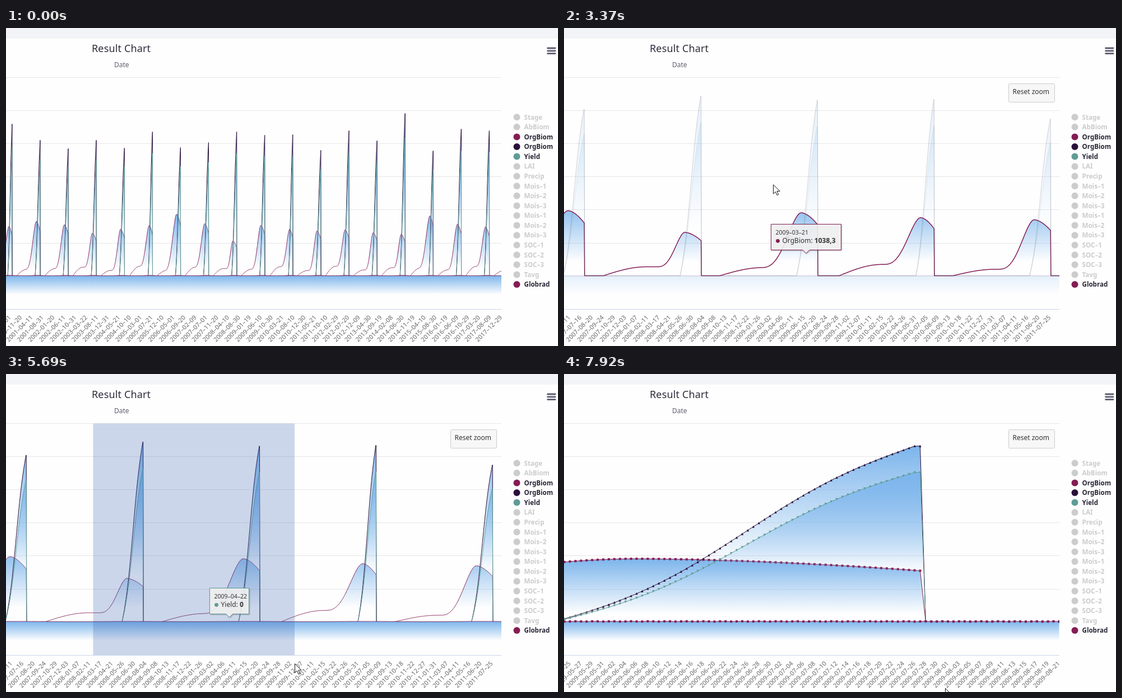
These frames come from a looping animation (985 by 568 pixels, 8 s). An HTML page:

```html
<!DOCTYPE html>
<html lang="en">
<head>
<meta charset="utf-8">
<title>Result Chart</title>
<style>
html, body { margin: 0; width: 100%; height: 100%; overflow: hidden; background: #fefefe; }
svg { display: block; font-family: "Noto Sans", "Open Sans", sans-serif; }
.tip { filter: drop-shadow(1px 1px 1px rgba(0, 0, 0, .3)); }
</style>
</head>
<body>
<script>
const LOOP = 8000, RIGHT = 884, TOP = 88.5, BOTTOM = 502, ZERO = 442.5, ROW = 59.1;
const UNIT = 2000 / ROW;               // value per pixel at zoomed scale
const MAROON = '#841d54', NAVY = '#2a0f3a', TEAL = '#5f9c96';
const DAY = 864e5, ORIGIN = Date.UTC(2009, 6, 27);
const { sin, cos, min, max, PI } = Math;

const clamp = u => max(0, min(1, u));
const smoothstep = u => u * u * (3 - 2 * u);
const day = s => (Date.parse(s) - ORIGIN) / DAY;
const wide = s => s.replace(/-/g, '\u2013');
const dateText = d => wide(new Date(ORIGIN + d * DAY).toISOString().slice(0, 10));

function set(e, attrs) {
  for (const k in attrs) e.setAttribute(k, attrs[k]);
}
function el(tag, attrs, parent, text) {
  const e = document.createElementNS('http://www.w3.org/2000/svg', tag);
  set(e, attrs);
  if (text) e.textContent = text;
  parent.appendChild(e);
  return e;
}
const show = (e, on) => e.setAttribute('visibility', on ? 'visible' : 'hidden');

// ---- Data: one growing season per year from 2000, each ending on 27 July ----
const GRAIN = [271, 242, 227, 242, 228, 257, 229, 238, 257, 251, 252, 224, 259, 241, 290, 223, 262, 259, 260];
const HUMP = [88, 97, 91, 76, 83, 90, 110, 93, 62, 90, 83, 80, 82, 77, 74, 107, 92, 87, 90];

const seasons = GRAIN.map((grain, i) => ({
  end: day(2000 + i + '-07-27'),
  grain: grain * 1.25,
  hump: HUMP[i] * 1.25,
  lead: i % 5 ? 51 : 42,               // days from hump to harvest
  winter: 16.4181 + 4.9016 * cos(2.65 * (i - 5))
}));
const seasonOf = d => seasons.find(s => d <= s.end) || seasons[seasons.length - 1];

// Autumn ramp to a winter level, spring growth, then a slow decline to harvest.
function biomass(d) {
  const s = seasonOf(d), rel = d - s.end + s.lead;
  if (rel > 0) return s.hump * (1 - .19 * (rel / s.lead) ** 1.7);
  const ramp = sin(PI / 2 * clamp((rel + 255) / 135));
  const spring = smoothstep(clamp(1 + rel / (1.15 * s.hump)) ** 1.5);
  return s.winter * ramp + (s.hump - s.winter) * spring;
}
function organ(d) {
  const s = seasonOf(d), span = s.lead + 15;
  const p = clamp((d - s.end + span) / (span - 1)) ** 1.07;
  return s.grain * (p - .05 * sin(2 * PI * p));
}
function radiation(d) {
  const v = 10.41576 + 9 * cos(2 * PI * (d + 35) / 365.25) + 9.7115 * sin(1.9 * d);
  return max(2, v) / UNIT;
}

const SQUARE = 'M-2 -2h4v4h-4z';
const SERIES = [
  { name: 'OrgBiom', color: MAROON, value: biomass, digits: 1, gap: 15.5, mark: SQUARE },
  { name: 'OrgBiom', color: NAVY, value: organ, digits: 1, gap: 15.5, mark: 'M0 -2.2l2.2 4.2h-4.4z' },
  { name: 'Yield', color: TEAL, value: d => .85 * organ(d), digits: 1, gap: 14.5, mark: 'M0 2.2l2.2 -4.2h-4.4z' },
  { name: 'Globrad', color: MAROON, value: radiation, digits: 2, gap: 19, mark: SQUARE }
];

// ---- Zoom levels: day `at` sits at x, px per day, y scale k, label step ----
const VIEWS = [
  { from: 0, at: day('2017-12-31'), x: RIGHT, px: .13714, k: .8, step: 142, last: day('2017-12-29') },
  { from: 2840, at: 0, x: 452.5, px: .5695, k: 1, step: 35, last: day('2011-07-25') },
  { from: 5760, at: 0, x: 634.5, px: 2.215, k: 1, step: 9, last: day('2009-11-11') },
  { from: 7690, at: 0, x: 635.5, px: 9.92, k: 1, step: 2, last: day('2009-08-21') }
];
const xOf = (v, d) => v.x + (d - v.at) * v.px;
const dayAt = (v, x) => Math.round(v.at + (x - v.x) / v.px);
const yOf = (v, s, d) => ZERO - s.value(d) * v.k;

// ---- Timeline ----
const CURSOR = [
  [440, 384, 340], [1200, 233, 170], [1260, 225.7, 163], [1450, 227, 163], [2160, 391, 330],
  [2590, 567, 435], [2840, 567, 435], [3990, 147, 98], [4400, 147, 98], [4470, 156, 110],
  [5180, 398, 502], [5400, 515, 517], [5800, 515, 517], [6270, 373, 250], [6600, 422, 340],
  [6900, 579, 502], [7000, 634, 543], [7460, 690, 566], [7610, 690, 566], [7920, 680, 561]
];
function cursor(t) {
  const next = CURSOR.findIndex(c => c[0] > t);
  if (next < 1) return CURSOR[next < 0 ? CURSOR.length - 1 : 0].slice(1);
  const a = CURSOR[next - 1], b = CURSOR[next], u = (t - a[0]) / (b[0] - a[0]);
  return [a[1] + (b[1] - a[1]) * u, a[2] + (b[2] - a[2]) * u];
}

const POINT_LAG = 17.6, HALO_LAG = 70, TIP_LAG = 160, DIM_LAG = 40;
const DRAGS = [[1450, 2840, 227], [4470, 5760, 156], [6270, 7690, 373]];
const PRESSES = [[1290, 2800], [4440, 5600], [6250, 7500]];
const HOLDS = [[2590, 2760], [7460, 7610], [7920, 8000]];
// [enter, leave, dimming gone, tooltip gone]
const HOVERS = [[480, 2840, 2840, 2840], [2950, 5180, 5480, 5720], [5850, 6900, 7200, 7420]];
const NEAREST = [[0, 0], [2560, 3], [2840, 0], [4900, 2], [5800, 0], [6650, 3]];
const nearest = t => NEAREST.filter(n => n[0] <= t).pop()[1];
const within = (list, t) => list.find(r => t >= r[0] && t < r[1]);

// ---- Static parts ----
const svg = el('svg', { width: 985, height: 568, viewBox: '0 0 985 568' }, document.body);
const defs = el('defs', {}, svg);
el('rect', { width: RIGHT, height: 568 }, el('clipPath', { id: 'plot' }, defs));
el('rect', { width: 985, height: 568, fill: '#fefefe' }, svg);
el('rect', { width: 985, height: 19, fill: '#f3f4f8' }, svg);
el('text', { x: 153, y: 43, 'font-size': 18, 'letter-spacing': .15, fill: '#2f2b3a' }, svg, 'Result Chart');
el('text', { x: 193, y: 70, 'font-size': 12, fill: '#5e5e70' }, svg, 'Date');
for (let i = 0; i < 3; i++)
  el('path', { d: `M966.5 ${36 + 4.8 * i}h13.5`, stroke: '#5b5b6e', 'stroke-width': 2.8, 'stroke-linecap': 'round' }, svg);
for (let i = 0; i < 7; i++)
  el('path', { d: `M0 ${Math.floor(TOP + ROW * i) + .5}H${RIGHT}`, stroke: '#e6e6e6' }, svg);
el('path', { d: `M0 ${BOTTOM}.5H${RIGHT}`, stroke: '#ccd6eb' }, svg);

const LEGEND = ['Stage', 'AbBiom', 'OrgBiom', 'OrgBiom', 'Yield', 'LAI', 'Precip', 'Mois-1', 'Mois-2', 'Mois-3',
  'Mois-1', 'Mois-2', 'Mois-3', 'SOC-1', 'SOC-2', 'SOC-3', 'Tavg', 'Globrad'];
const LEGEND_ON = { 2: MAROON, 3: NAVY, 4: TEAL, 17: MAROON };
LEGEND.forEach((name, i) => {
  const y = 159.3 + 17.57 * i, on = LEGEND_ON[i];
  el('circle', { cx: 911.5, cy: y, r: 6, fill: on || '#ccc' }, svg);
  el('text', { x: 924.5, y: y + 4.3, 'font-size': 11.6, 'font-weight': 700, fill: on ? '#2a2536' : '#ccc' }, svg, wide(name));
});

// ---- One prepared group per zoom level ----
function buildLayer(v, s, id, plot) {
  const layer = el('g', {}, plot), marks = [];
  let top = ZERO, line = '';
  for (let d = dayAt(v, -520); d <= dayAt(v, RIGHT); d++) {
    const x = xOf(v, d), y = yOf(v, s, d);
    top = min(top, y);
    if (x < -15) continue;
    line += (line ? 'L' : 'M') + x.toFixed(2) + ' ' + y.toFixed(2);
    if (v.px > 5) marks.push([x, y]);
  }
  const grad = el('linearGradient', {
    id, gradientUnits: 'userSpaceOnUse', x1: 0, x2: 0, y1: top, y2: top + .57 * (BOTTOM - top)
  }, defs);
  el('stop', { offset: 0, 'stop-color': '#7cb5ec' }, grad);
  el('stop', { offset: 1, 'stop-color': '#7cb5ec', 'stop-opacity': 0 }, grad);
  el('path', { d: `${line}V${BOTTOM}H-15Z`, fill: `url(#${id})` }, layer);
  el('path', { d: line, fill: 'none', stroke: s.color, 'stroke-linejoin': 'round' }, layer);
  for (const [x, y] of marks)
    el('path', { d: s.mark, transform: `translate(${x} ${y})`, fill: s.color }, layer);
  return layer;
}
VIEWS.forEach((v, n) => {
  v.group = el('g', {}, svg);
  const plot = el('g', { 'clip-path': 'url(#plot)' }, v.group);
  v.layers = SERIES.map((s, i) => buildLayer(v, s, `fade${n}${i}`, plot));
  for (let d = v.last; xOf(v, d) > -5; d -= v.step)
    el('text', {
      transform: `translate(${xOf(v, d) + 2} 517.8) rotate(-45)`,
      'text-anchor': 'end', 'font-size': 11, fill: '#666'
    }, v.group, dateText(d));
});

// ---- Moving parts ----
const halo = el('circle', { r: 9.5, 'fill-opacity': .25 }, svg);
const dot = el('rect', { width: 7, height: 7, stroke: '#fff' }, svg);

const reset = el('g', {}, svg);
el('rect', { x: 793.5, y: 99.5, width: 82, height: 33, rx: 2, fill: '#f7f7f7', stroke: '#ccc' }, reset);
el('text', { x: 800.5, y: 118, 'font-size': 12, fill: '#333' }, reset, 'Reset zoom');

const band = el('rect', { y: TOP, height: BOTTOM - TOP, fill: 'rgba(51,92,173,.25)' }, svg);

const tip = el('g', { class: 'tip' }, svg);
const tipBox = el('path', { fill: 'rgba(247,247,247,.88)', 'stroke-linejoin': 'round' }, tip);
const tipDate = el('text', { 'font-size': 10.5, fill: '#333' }, tip);
const tipDot = el('circle', { r: 3.4 }, tip);
const tipLine = el('text', { 'font-size': 12, fill: '#333' }, tip);
const tipName = el('tspan', {}, tipLine);
const tipValue = el('tspan', { 'font-weight': 700 }, tipLine);

const glow = el('circle', { r: 15, fill: 'rgba(255,240,40,.65)' }, svg);
const arrow = el('path', {
  d: 'M0 0V16.2L3.8 12.6L6.6 18.8L9.2 17.7L6.4 11.6H11.6Z', fill: '#fff', stroke: '#111'
}, svg);

function drawTip(v, s, d, cx) {
  const value = +(s.value(d) * UNIT).toFixed(s.digits);
  tipName.textContent = s.name + ': ';
  tipValue.textContent = String(value).replace('.', ',');
  tipDate.textContent = dateText(d);
  const w = Math.round(30 + tipLine.getComputedTextLength()), h = 46;
  const left = Math.round(cx - w / 2) + .5, top = Math.round(yOf(v, s, d) - s.gap - h) + .5;
  set(tipBox, { d: `M${left} ${top}h${w}v${h}H${left + w / 2 + 6}l-6 6l-6 -6H${left}z`, stroke: s.color });
  set(tipDate, { x: left + 8, y: top + 18 });
  set(tipDot, { cx: left + 12, cy: top + 29.8, fill: s.color });
  set(tipLine, { x: left + 20, y: top + 33.5 });
}

function drawHover(v, t) {
  const hover = HOVERS.find(h => t >= h[0] && t < h[3]);
  const active = hover && t >= hover[0] + DIM_LAG && t < hover[2] ? nearest(t - DIM_LAG) : -1;
  v.layers.forEach((l, i) => set(l, {
    opacity: active < 0 || i === active ? 1 : .2,
    'stroke-width': i === active ? 1.5 : 1
  }));
  const inside = active >= 0 && t < hover[1];
  const point = hover ? nearest(min(t, hover[1])) : -1;
  show(tip, hover);
  show(halo, inside);
  show(dot, inside && point === active);
  if (!hover) return;

  const past = lag => cursor(max(hover[0], min(t - lag, hover[1])))[0];
  drawTip(v, SERIES[point], dayAt(v, past(POINT_LAG)), past(TIP_LAG));
  if (!inside) return;
  const s = SERIES[active], d = dayAt(v, past(HALO_LAG)), x = xOf(v, d), y = yOf(v, s, d);
  set(halo, { cx: x, cy: y, fill: s.color });
  set(dot, { x: x - 3.5, y: y - 3.5, fill: s.color });
}

function draw(time) {
  const hold = within(HOLDS, time), t = hold ? hold[0] : time;
  const view = VIEWS.filter(v => v.from <= t).pop();
  for (const v of VIEWS) set(v.group, { display: v === view ? 'inline' : 'none' });
  show(reset, view !== VIEWS[0]);
  drawHover(view, t);

  const drag = within(DRAGS, t), width = drag ? cursor(t - POINT_LAG)[0] - drag[2] : 0;
  show(band, width > 2);
  if (width > 2) set(band, { x: drag[2] - .5, width: width + .5 });

  const [x, y] = cursor(t);
  show(arrow, t >= CURSOR[0][0]);
  show(glow, within(PRESSES, t));
  set(arrow, { transform: `translate(${x + .5} ${y + .5})` });
  set(glow, { cx: x, cy: y + 1 });
}

const start = performance.now();
function tick() {
  draw((performance.now() - start) % LOOP);
  requestAnimationFrame(tick);
}
tick();
</script>
</body>
</html>
```
